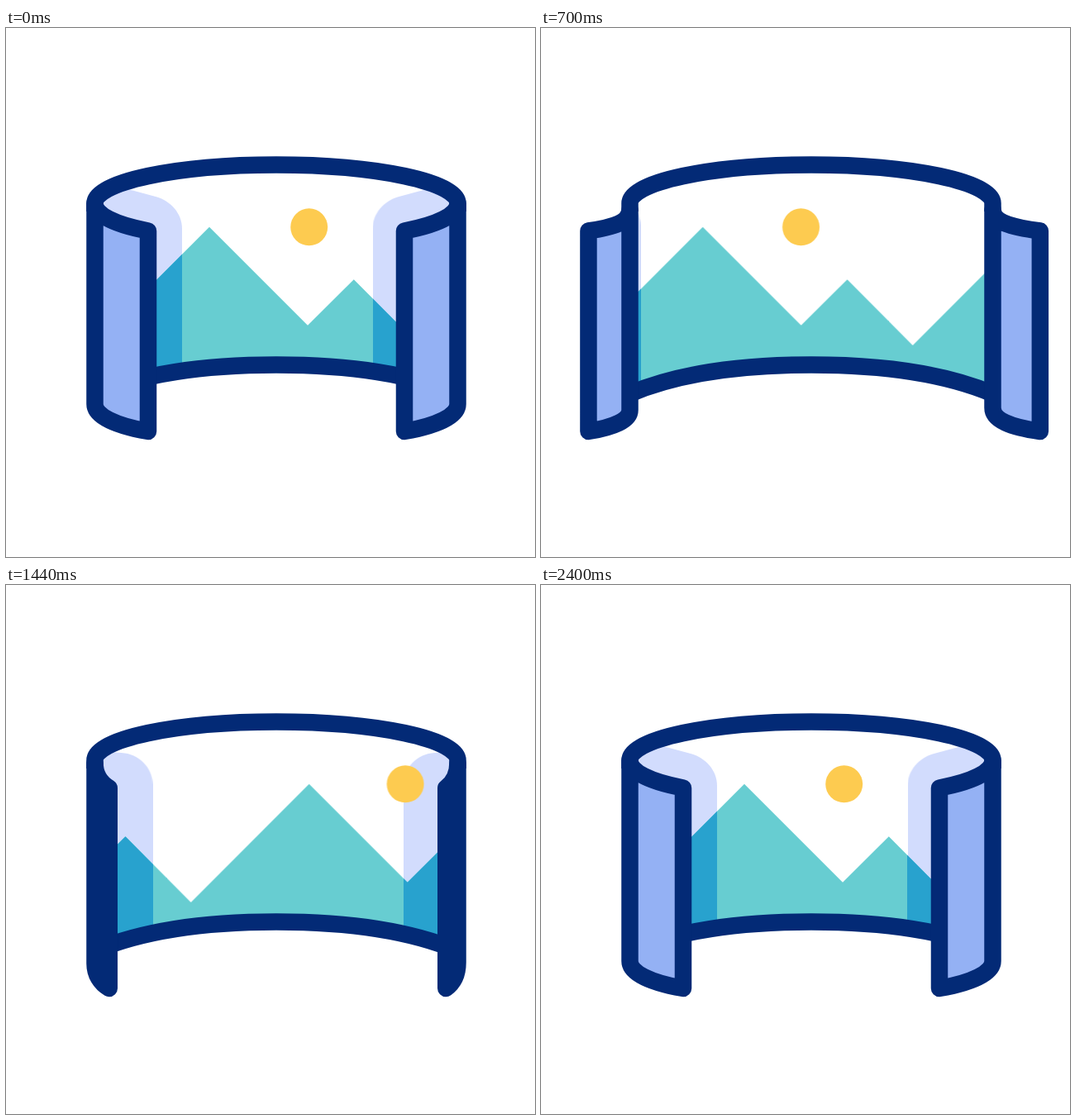
Recreate the animation shown at these times as an HTML page. Size 640 px wide and 640 px high, loop 2420 ms.

```html
<!DOCTYPE html>
<html lang="en">
<head>
<meta charset="utf-8">
<title>Panorama</title>
<style>
  html, body { margin: 0; width: 100%; height: 100%; overflow: hidden; background: #fff; }
  svg { display: block; width: 100vw; height: 100vh; }

  .line { fill: none; stroke: #032a76; stroke-width: 20.5; stroke-linejoin: round; }
  .flap { fill: #94b1f4; }
  .shade { fill: #d2dcfd; }
  .hills { fill: #67cdd1; }
  .dark { fill: #28a2ce; }
  .sun { fill: #fdcb50; }

  .flap, .shade, .scroll { animation: 2420ms linear infinite; }
  .flap { --ease: cubic-bezier(.24, 0, .76, 1); }
  .shade, .scroll { --ease: cubic-bezier(.3333, 0, .6667, 1); }
  .flap.l { animation-name: flap-l; }
  .flap.r { animation-name: flap-r; }
  .shade.l { animation-name: bend, shade-l; }
  .shade.r { animation-name: bend, shade-r; }
  .scroll { animation-name: scroll; }
  .sun.a { --shift: -412px; }
  .sun.b { --shift: -383px; }

  /* Folded at 0, 1200 and 2400 ms, spread at 600 and 1800 ms */
  @keyframes flap-l {
    0%, 49.587%, 99.174%, 100% {
      d: path("M107.5 212C107.5 226 132 238 172 245.5L172 488C132 481 107.5 469 107.5 455Z");
      animation-timing-function: cubic-bezier(.24, 0, .76, 1);
    }
    24.793%, 74.38% {
      d: path("M107.5 220C107.5 236 84 241 44.8 245.5L44.8 488C84 483 107.5 475 107.5 463Z");
      animation-timing-function: cubic-bezier(.24, 0, .76, 1);
    }
  }
  @keyframes flap-r {
    0%, 49.587%, 99.174%, 100% {
      d: path("M546.5 212C546.5 226 522 238 482 245.5L482 488C522 481 546.5 469 546.5 455Z");
      animation-timing-function: cubic-bezier(.24, 0, .76, 1);
    }
    24.793%, 74.38% {
      d: path("M546.5 220C546.5 236 573 241 617.3 245.5L617.3 488C573 483 546.5 475 546.5 460Z");
      animation-timing-function: cubic-bezier(.24, 0, .76, 1);
    }
  }
  @keyframes bend {
    0%, 49.587%, 99.174%, 100% {
      d: path("M-106 184L-32 204C-14 209 0 224 0 243L0 470L-106 470Z");
      animation-timing-function: cubic-bezier(.3333, 0, .6667, 1);
    }
    24.793%, 74.38% {
      d: path("M-106 222L-49 201C-22 195 0 215 0 239L0 470L-106 470Z");
      animation-timing-function: cubic-bezier(.3333, 0, .6667, 1);
    }
  }
  @keyframes shade-l {
    0%, 49.587%, 99.174%, 100% {
      transform: translateX(213px);
      animation-timing-function: cubic-bezier(.3333, 0, .6667, 1);
    }
    24.793%, 74.38% {
      transform: translateX(113px);
      animation-timing-function: cubic-bezier(.3333, 0, .6667, 1);
    }
  }
  @keyframes shade-r {
    0%, 49.587%, 99.174%, 100% {
      transform: translateX(443.5px) scaleX(-1);
      animation-timing-function: cubic-bezier(.3333, 0, .6667, 1);
    }
    24.793%, 74.38% {
      transform: translateX(548.5px) scaleX(-1);
      animation-timing-function: cubic-bezier(.3333, 0, .6667, 1);
    }
  }
  /* Scenery moves from 300 to 2100 ms */
  @keyframes scroll {
    0%, 12.397% {
      transform: translateX(0);
      animation-timing-function: cubic-bezier(.3333, 0, .6667, 1);
    }
    86.777%, 100% { transform: translateX(var(--shift, -397px)); }
  }
</style>
</head>
<body>
<svg viewBox="0 0 640 640">
  <defs>
    <clipPath id="screen">
      <path d="M107.5 212A219.5 46.5 0 0 1 546.5 212V442.5C492 419.5 417 407.5 327 407.5S162 419.5 107.5 442.5Z"/>
    </clipPath>
    <clipPath id="ridge">
      <path class="scroll" d="M-40 470V240.7L103 384L246 240.7L365 359.8L420.8 304.3L500 384L643 240.7L762 359.8L817.8 304.3L897 384L1040 240.7V470Z"/>
    </clipPath>
  </defs>

  <g clip-path="url(#screen)">
    <path class="shade l"/>
    <path class="shade r"/>
    <path class="hills scroll" d="M-40 470V240.7L103 384L246 240.7L365 359.8L420.8 304.3L500 384L643 240.7L762 359.8L817.8 304.3L897 384L1040 240.7V470Z"/>
    <g clip-path="url(#ridge)">
      <path class="shade dark l"/>
      <path class="shade dark r"/>
    </g>
    <circle class="sun scroll a" cx="366.7" cy="240.8" r="22.5"/>
    <circle class="sun scroll b" cx="749.7" cy="240.8" r="22.5"/>
  </g>

  <path class="line" d="M107.5 442.5C162 419.5 237 407.5 327 407.5S492 419.5 546.5 442.5"/>
  <path class="line flap l"/>
  <path class="line flap r"/>
  <path class="line" d="M107.5 222V212A219.5 46.5 0 0 1 546.5 212V222"/>
</svg>
</body>
</html>
```
